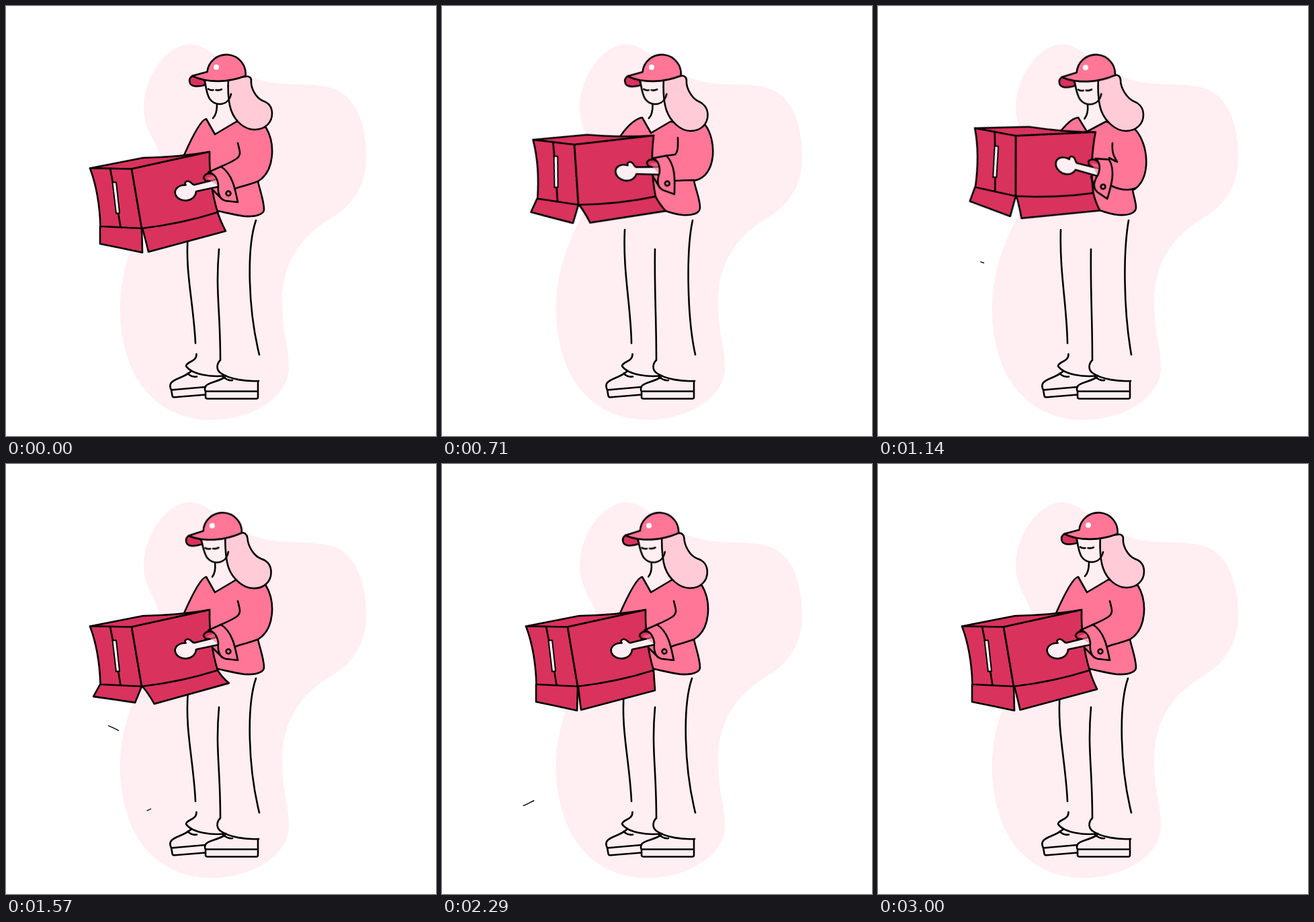
Write an HTML page without scripts that moves like this. It is 640 px wide and 640 px high and loops after 3070 ms.

```html
<!DOCTYPE html>
<html lang="en">
<head>
<meta charset="utf-8">
<title>Courier with a box</title>
<style>
html, body { margin: 0; width: 100%; height: 100%; overflow: hidden; background: #fff; }
svg { display: block; width: 100%; height: 100%; }

.ink { fill: none; stroke: #000; stroke-width: 2.6; stroke-linecap: round; stroke-linejoin: round; }
.skin { fill: #ffeef2; }
.pink { fill: #ff7697; }
.red { fill: #d9325d; }
.hair { fill: #ffcbd7; }
.white { fill: #fff; }
.none { stroke: none; }

.move { animation: 3070ms linear infinite; }
#box { animation-name: box; transform-origin: 202px 331px; }
#hand { animation-name: hand; transform-origin: 331px 279px; }
#shirt { animation-name: shirt; }
#arm { animation-name: arm; }
#legs { animation-name: legs; }
#flapL { animation-name: flapL; }
#flapR { animation-name: flapR; }
#head { animation-name: head; transform-origin: 315px 108px; }
#hair { animation-name: hair; }
#neck { animation-name: neck; }
.wind { stroke-width: 1.4; stroke-linecap: butt; }
#wind1 { stroke-dasharray: 24 400; animation-name: wind1; }
#wind2 { stroke-dasharray: 19 400; animation-name: wind2; }
#wind3 { stroke-dasharray: 11 400; animation-name: wind3; }

/* lift and drop */
@keyframes box {
  0%, 51.1%, 100% { transform: translate(0, 0) rotate(0deg); }
  11.7% { transform: translate(.8px, -17.4px) rotate(2.8deg); }
  23.1% { transform: translate(1px, -35px) rotate(5.8deg); animation-timing-function: cubic-bezier(.33,.5,.6,1); }
  37.1% { transform: translate(3px, -48px) rotate(9.7deg); animation-timing-function: ease-in-out; }
}
@keyframes hand {
  0%, 51.1%, 100% { transform: translate(0, 0) rotate(0deg); }
  11.7% { transform: translate(2.2px, -7.6px) rotate(7deg); }
  23.1% { transform: translate(4.3px, -14.8px) rotate(13.5deg); animation-timing-function: cubic-bezier(.33,.5,.6,1); }
  37.1% { transform: translate(4px, -10px) rotate(28deg); animation-timing-function: ease-in-out; }
}
@keyframes shirt {
  0%, 51.1%, 100% { d: path("M265 222C277 195 290 169 298 168L311 191L343 172L387 181C401 205 400 246 375 261C378 275 384 290 384 303C384 310 372 314 355 313C340 311 326 307 315 305"); }
  11.7% { d: path("M271 208C281 188 291 169 298 168L311 191L342 172L390 178C407 198 406 250 375 261C378 275 384 290 384 303C384 310 372 314 355 313C340 311 326 307 315 305"); }
  23.1% { d: path("M266 193C279 174 291 167 298 166L311 189L340 172L391 176C409 198 410 254 375 260C378 275 384 287 384 300C384 309 372 312 358 311C348 310 338 307 330 304"); animation-timing-function: cubic-bezier(.33,.5,.6,1); }
  37.1% { d: path("M272 186C283 173 290 167 298 166L311 187L339 172L383 184C403 206 406 254 384 271C382 273 381 273 379 274C381 285 384 292 384 300C384 308 373 312 358 311C348 310 338 307 330 304"); animation-timing-function: ease-in-out; }
}
@keyframes arm {
  0%, 51.1%, 100% { d: path("M345 204C348 216 351 222 342 228C334 233 327 236 320 239M340 272C352 268 365 265 375 261"); }
  11.7% { d: path("M347 201C349 213 351 223 342 227C336 229 331 230 326 231M343 266C355 263 367 263 375 260"); }
  23.1% { d: path("M351 196C351 208 352 216 347 221C343 222 338 222 333 223M345 260C355 260 365 259 375 259"); animation-timing-function: cubic-bezier(.33,.5,.6,1); }
  37.1% { d: path("M349 204C348 217 350 222 356 232C351 230 348 228 344 226M346 267C360 274 374 275 384 271"); animation-timing-function: ease-in-out; }
}
@keyframes legs {
  0%, 11.7%, 51.1%, 100% { d: path("M271 338C266 395 279 440 282 502M317 362C311.500 425 319 450 319 527M372 319C358 360 360 450 377 519"); }
  23.1% { d: path("M272 333C269 395 281 445 282 502M317 362C316 425 319 460 319 527M373 319C363 365 365 465 377 519"); }
  37.1% { d: path("M272 333C270 395 281 445 282 502M317 362C316 425 319 460 319 527M373 319C365 365 365 450 377 519"); animation-timing-function: ease-in-out; }
}
@keyframes flapL {
  0%, 11.7%, 97.7%, 100% { d: path("M140 328L140 354Q170 360 203 367L202 331"); }
  23.1% { d: path("M140 328L133 349Q163 354 197 359L202 331"); }
  29.3% { d: path("M140 328L112 339Q142 342 175 345L202 331"); }
  37.1% { d: path("M140 328L136 350Q167 356 199 362L202 331"); }
  51.1% { d: path("M140 328L130 346Q160 350 192 355L202 331"); animation-timing-function: ease-out; }
  62%, 74.6% { d: path("M140 328L140 354Q170 360 201 367L202 331"); }
}
@keyframes flapR {
  0%, 100% { d: path("M203 331Q207 345 212 366L327 335Q319 320 315 307"); }
  11.7% { d: path("M203 331Q208 345 215 365L328 335Q320 320 315 307"); }
  23.1% { d: path("M203 331Q211 339 222 356L332 327Q322 318 315 307"); }
  29.3% { d: path("M203 331Q216 334 236 341L346 314Q328 312 315 307"); }
  37.1% { d: path("M203 331Q209 343 216 362L329 331Q320 319 315 307"); }
  51.1% { d: path("M203 331Q211 340 221 357L332 326Q322 318 315 307"); animation-timing-function: ease-out; }
  62%, 74.6% { d: path("M203 331Q204 345 207 366L317 337Q316 322 315 307"); }
}

/* head nod */
@keyframes head {
  0%, 9.8%, 100% { transform: translate(0, 0) rotate(0deg); animation-timing-function: ease-in-out; }
  57%, 61.9% { transform: translate(-5.5px, .8px) rotate(-3.2deg); animation-timing-function: ease-in-out; }
}
@keyframes hair {
  0%, 100% { d: path("M331 108C330 125 331 143 335 155C341 172 355 184 370 184C386 184 396 173 396 160C396 148 388 143 382 141C371 136 364 121 365 111C365 106 361 104 357 105Z"); }
  11.7% { d: path("M331 108C330 125 331 143 335 155C341 172 355 185 370 185C386 185 396 174 396 161C396 149 388 144 382 142C371 137 364 121 365 111C365 106 361 104 357 105Z"); }
  23.1% { d: path("M330 108C329 125 330 143 334 155C340 172 355 186 370 186C386 186 395.500 175 395.500 162C395.500 150 387 144 382 142C371 137 363 121 364 111C364 106 360 103 356 104Z"); }
  37.1% { d: path("M328 108C327 125 328 143 332 155C338 172 354 186 369 186C385 186 395 175 395 162C395 150 387 144 381 142C370 137 361 122 361 110C361 105 357 102 353 103Z"); }
  54%, 62% { d: path("M326 108C326 125 327 142 331 154C337 171 353 185 369 185C385 185 394.500 174 394.500 161C394.500 149 387 143 380 141C368 137 360 122 359 110C358 104 354 102 350 102Z"); animation-timing-function: ease-in-out; }
}
@keyframes neck {
  0%, 9.8%, 100% { d: path("M314 147C314 156 312 163 308 167"); animation-timing-function: ease-in-out; }
  57%, 61.9% { d: path("M311 148C312 157 310 164 307 168"); animation-timing-function: ease-in-out; }
}

/* gusts */
@keyframes wind1 {
  0%, 36.2% { stroke-dashoffset: 24.5; }
  50.2%, 100% { stroke-dashoffset: -101; }
}
@keyframes wind2 {
  0%, 47.2% { stroke-dashoffset: 19.5; }
  71.7%, 100% { stroke-dashoffset: -101; }
}
@keyframes wind3 {
  0%, 49.2% { stroke-dashoffset: 11.5; }
  74.6% { stroke-dashoffset: -51; }
  93.2%, 100% { stroke-dashoffset: -101; }
}
</style>
</head>
<body>
<svg viewBox="0 0 640 640">
  <path class="skin" d="M274 57C304 57 322 92 372 108C412 122 446 112 484 122C520 132 537 176 536 228C535 272 512 299 482 317C452 335 411 370 411 440C411 490 421 505 421 540C419 586 362 616 305 616C238 616 195 572 180 520C164 470 167 410 187 360C206 308 233 280 230 232C228 200 204 190 205 148C206 105 240 57 274 57Z"/>

  <g class="ink">
    <path class="move wind" id="wind1" pathLength="100" d="M158 382.500C140 376 115 372 84 388"/>
    <path class="move wind" id="wind2" pathLength="100" d="M168 397C150 387 115 372 80 392"/>
    <path class="move wind" id="wind3" pathLength="100" d="M216 513C205 519 190 523 170 518C155 512 150 496 137 501C128 505 115 514 100 511C85 509 75 502 58 505"/>

    <path class="move" id="legs" d="M271 338C266 395 279 440 282 502M317 362C311.500 425 319 450 319 527M372 319C358 360 360 450 377 519"/>
    <!-- left foot -->
    <path d="M283.500 518C284 530 268 529 268 536C277 549 308 553 327 550"/>
    <path d="M275 544C264 555 240 555 245 569L246 571.500L297 567M246 571.500L247.500 580Q248 582.500 250.500 582.300L297 578.500M270 547C275 551 279 553 284 551.500"/>
    <!-- right foot -->
    <path d="M319 527C313 533 313 541 319 546C333 556 358 559 376 558"/>
    <path d="M326 552.500C313 560 300 561 297 566Q295 571 297 573.500H375M297 573.500V582Q297 584.500 300 584.500H372.500Q375 584.500 375 582V559M323 552C328 556 332 558 337 557"/>

    <path class="move" id="neck" d="M314 147C314 156 312 163 308 167"/>
    <path class="move pink" id="shirt" d="M265 222C277 195 290 169 298 168L311 191L343 172L387 181C401 205 400 246 375 261C378 275 384 290 384 303C384 310 372 314 355 313C340 311 326 307 315 305"/>
    <path class="move" id="arm" d="M345 204C348 216 351 222 342 228C334 233 327 236 320 239M340 272C352 268 365 265 375 261"/>

    <g class="move red" id="box">
      <path class="move" id="flapL" d="M140 328L140 354Q170 360 203 367L202 331"/>
      <path class="move" id="flapR" d="M203 331Q207 345 212 366L327 335Q319 320 315 307"/>
      <path d="M125 241.500L204 226Q258 225 303 217L187 242.500Z"/>
      <path d="M125 241.500L187 242.500L202 331L140.500 328Q139 279 125 241.500Z"/>
      <path d="M187 242.500L303 217Q302 264 315 307Q262 324 202 331Z"/>
      <path d="M155 242Q163 282 170.500 329"/>
      <path class="white" stroke-width="2" d="M158.500 262.500H164L169 308L164 309Z"/>
    </g>

    <g class="move" id="hand">
      <path class="red" d="M294 256C296 248 306 247 312 254L315 264L297 260Z"/>
      <path class="skin" d="M313 258L281 266C278 267 276 262 272 261C268 260 265 263 267.500 266.500C258 266 250 272 252 280C256 293 281 294 283 276L316 269"/>
      <path class="pink none" opacity=".6" d="M299 256L311 252L317 269Z"/>
      <path d="M308 274L322 288"/>
      <path class="pink" d="M301 247.500L320 239C337 250 341 272 345 292L327 290C316 287 315 276 316 266C314 254 308 248 301 247.500Z"/>
      <circle class="pink" cx="331" cy="279" r="3.400"/>
    </g>

    <path class="move hair" id="hair" d="M331 108C330 125 331 143 335 155C341 172 355 184 370 184C386 184 396 173 396 160C396 148 388 143 382 141C371 136 364 121 365 111C365 106 361 104 357 105Z"/>
    <g class="move" id="head">
      <path d="M296 112C298 124 299 132 303 138C308 145 314 146 318 146C327 146 333 140 335 131"/>
      <path d="M301 123.500Q304 126 308.500 125M312.500 125Q317 126 321 124"/>
      <path class="red" d="M278 104C271 107 272 116 278 118.500C283 120.500 291 119 297 117.500L295 110Z"/>
      <path class="pink" d="M299.500 98A28.600 28.600 0 0 1 356.500 104C331 114 300 115 277 104Z"/>
      <circle class="white none" cx="313" cy="91" r="4"/>
    </g>
  </g>
</svg>
</body>
</html>
```
